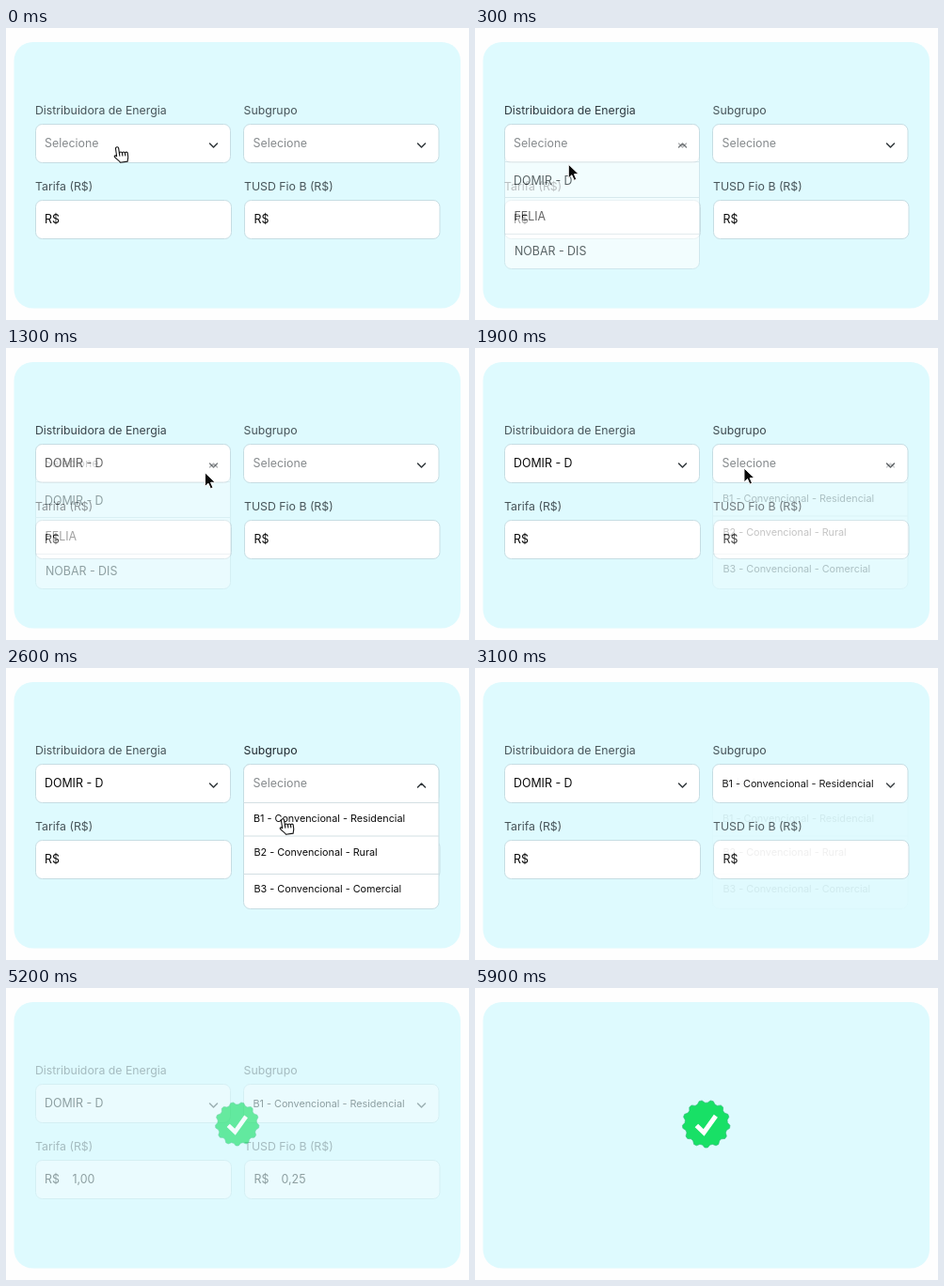
Animation, 492 px wide and 311 px high, one loop 6 s. Source, as an HTML page:

```html
<!DOCTYPE html>
<html lang="pt-BR">
<head>
<meta charset="utf-8">
<title>Formulário de tarifa</title>
<style>
  html, body { margin: 0; width: 100%; height: 100%; overflow: hidden; background: #fefefe; }
  svg { display: block; width: 492px; height: 311px; }
  text { font: 12.4px Inter, sans-serif; fill: #0b0b0b; }
  .label { font-size: 12.3px; fill: #1d262c; fill-opacity: .78; }
  .hint { fill: #868a8d; }
  .small { font-size: 10.8px; }
  .box { fill: #fff; stroke: #c6dde3; }
  .rule { fill: none; stroke: #d3dfe3; }
  .chev { fill: none; stroke: #30363a; stroke-width: 1.5; stroke-linecap: round; stroke-linejoin: round; }
  .hand { fill: #fff; stroke: #111; stroke-width: 1.1; stroke-linejoin: round; stroke-linecap: round; }
  .arrow { fill: #0a0a0a; stroke: #fff; stroke-width: 1; stroke-linejoin: round; }

  #form { opacity: calc(1 - var(--done)); }
  #badge { opacity: var(--done); }
  #typed { opacity: var(--typed); }
  #first { --open: var(--openA); --set: var(--setA); }
  #second { --open: var(--openB); --set: var(--setB); }
  .label.live { fill-opacity: calc(.78 + .2 * var(--open)); }
  .menu, .up { opacity: var(--open); }
  .down { opacity: calc(1 - var(--open)); }
  .value { opacity: var(--set); }
  .hint { opacity: calc(1 - var(--set)); }
</style>
</head>
<body>
<svg viewBox="0 0 492 311">
  <rect x="8.5" y="15" width="474.5" height="283.5" rx="20" fill="#defafe"/>

  <g id="form">
    <text class="label" x="31" y="172.5">Tarifa (R$)</text>
    <text class="label" x="253" y="172.5">TUSD Fio B (R$)</text>
    <rect class="box" x="31.5" y="183.5" width="208" height="41" rx="7"/>
    <rect class="box" x="253.5" y="183.5" width="207.5" height="41" rx="7"/>
    <text x="41" y="208">R$</text>
    <text x="263.5" y="208">R$</text>
    <g id="typed">
      <text x="70.5" y="208">1,00</text>
      <text x="292.5" y="208">0,25</text>
    </g>

    <g id="first">
      <text class="label live" x="31" y="91.5">Distribuidora de Energia</text>
      <rect class="box" x="31.5" y="102.5" width="207" height="41" rx="7"/>
      <g class="menu">
        <rect class="box" x="31.5" y="102.5" width="207" height="154" rx="7"/>
        <path class="rule" d="M31.5 142.5h207M31.5 180.5h207M31.5 219.5h207"/>
        <text x="41" y="166.5">DOMIR - D</text>
        <text x="41.5" y="204.5">FELIA</text>
        <text x="42" y="241.5">NOBAR - DIS</text>
      </g>
      <text class="hint" x="41" y="127">Selecione</text>
      <text class="value" x="41" y="127">DOMIR - D</text>
      <path class="chev down" d="M216.5 123l4 4 4-4"/>
      <path class="chev up" d="M216.5 127l4-4 4 4"/>
    </g>

    <g id="second">
      <text class="label live" x="252.5" y="91.5">Subgrupo</text>
      <rect class="box" x="252.5" y="102.5" width="207.5" height="41" rx="7"/>
      <g class="menu">
        <rect class="box" x="252.5" y="102.5" width="207.5" height="154" rx="7"/>
        <path class="rule" d="M252.5 143.5h207.5M252.5 179h207.5M252.5 219.5h207.5"/>
        <text class="small" x="263" y="163.5">B1 - Convencional - Residencial</text>
        <text class="small" x="263.5" y="200">B2 - Convencional - Rural</text>
        <text class="small" x="263.5" y="238.5">B3 - Convencional - Comercial</text>
      </g>
      <text class="hint" x="262.5" y="127">Selecione</text>
      <text class="value small" x="262.5" y="127">B1 - Convencional - Residencial</text>
      <path class="chev down" d="M437.5 123l4 4 4-4"/>
      <path class="chev up" d="M437.5 127l4-4 4 4"/>
    </g>
  </g>

  <g id="badge">
    <path id="seal" fill="#18e066" stroke="#2cb877" stroke-width=".6" stroke-linejoin="round"/>
    <path d="M-10.3 1.7L-2.5 9.2 10.2-8.6" fill="none" stroke="#fff" stroke-width="5"/>
  </g>

  <g id="cursor">
    <path class="arrow" d="M0 0V15l3.6-3.4 2.4 5.6 2.6-1.1-2.4-5.5H11z"/>
    <g class="hand" transform="rotate(-8)">
      <path d="M-1.7 9.4V1.3a1.6 1.6 0 0 1 3.2 0V6.6a1.6 1.6 0 0 1 3.1.3a1.5 1.5 0 0 1 2.9.5a1.4 1.4 0 0 1 2.7.8V11.5c0 2-1 3-1.2 5H1.2C.5 14.5-2 13-3.8 10.3c-1-1.6.8-2.6 2.1-.9z"/>
      <path d="M1.5 6.6v3M4.6 7v2.8M7.5 7.5v2.5"/>
    </g>
  </g>
</svg>
<script>
  const LOOP = 6000, TICK = 100;
  const $ = s => document.querySelector(s);
  const root = document.documentElement.style;
  const cursor = $('#cursor'), arrow = $('.arrow'), hand = $('.hand'), badge = $('#badge');

  // Thirteen-point seal with one point straight down
  const POINTS = 13;
  $('#seal').setAttribute('d', 'M' + Array.from({ length: POINTS * 4 }, (_, i) => {
    const a = Math.PI / 2 + (i - .5) * Math.PI / POINTS / 2;
    const r = i % 4 < 2 ? 25.3 : 22.7;
    return (r * Math.cos(a)).toFixed(2) + ' ' + (r * Math.sin(a)).toFixed(2);
  }).join('L') + 'Z');

  const ease = x => 1 - (1 - x) ** 1.75;
  const part = (t, start, n) => Math.min(Math.max((t - start) / TICK + 1, 0), n) / n;
  const prog = (t, start, n) => ease(part(t, start, n));

  // Start time, steps, from, to
  const moves = [
    [100, 7, [118, 127], [88, 156]],
    [1100, 7, [89, 157], [285, 118]],
    [1900, 7, [285, 118], [289, 160]],
    [2800, 5, [291, 161], [300, 332]]
  ];

  function drawCursor(t) {
    const pressed = t < 100 || (t >= 800 && t < 1100) || (t >= 2600 && t < 2800);
    let x = 118, y = 127;
    for (const [start, n, from, to] of moves) {
      if (t < start) break;
      const p = prog(t, start, n);
      x = from[0] + (to[0] - from[0]) * p;
      y = from[1] + (to[1] - from[1]) * p;
    }
    if (pressed && t >= 800) { x += t < 1100 ? 2 : 5; y += 1; }
    const size = t === 800 ? .92 : 1;
    cursor.setAttribute('transform', `translate(${x} ${y}) scale(${size})`);
    arrow.style.display = pressed ? 'none' : '';
    hand.style.display = pressed ? '' : 'none';
  }

  function draw(t) {
    const setA = prog(t, 1100, 7), setB = prog(t, 2800, 5);
    const vars = {
      setA, setB,
      openA: prog(t, 100, 7) - setA,
      openB: prog(t, 1900, 7) - setB,
      typed: prog(t, 3700, 5),
      done: prog(t, 5000, 7)
    };
    for (const k in vars) root.setProperty('--' + k, vars[k].toFixed(4));
    const size = .2 + 1.68 * part(t, 5000, 7) - 1.41 * prog(t, 5700, 7);
    badge.setAttribute('transform', `translate(245.7 144.8) scale(${size})`);
    drawCursor(t);
  }

  let begin;
  function loop(now) {
    begin ??= now;
    draw(Math.floor((now - begin) % LOOP / TICK) * TICK);
    requestAnimationFrame(loop);
  }
  draw(0);
  requestAnimationFrame(loop);
</script>
</body>
</html>
```
